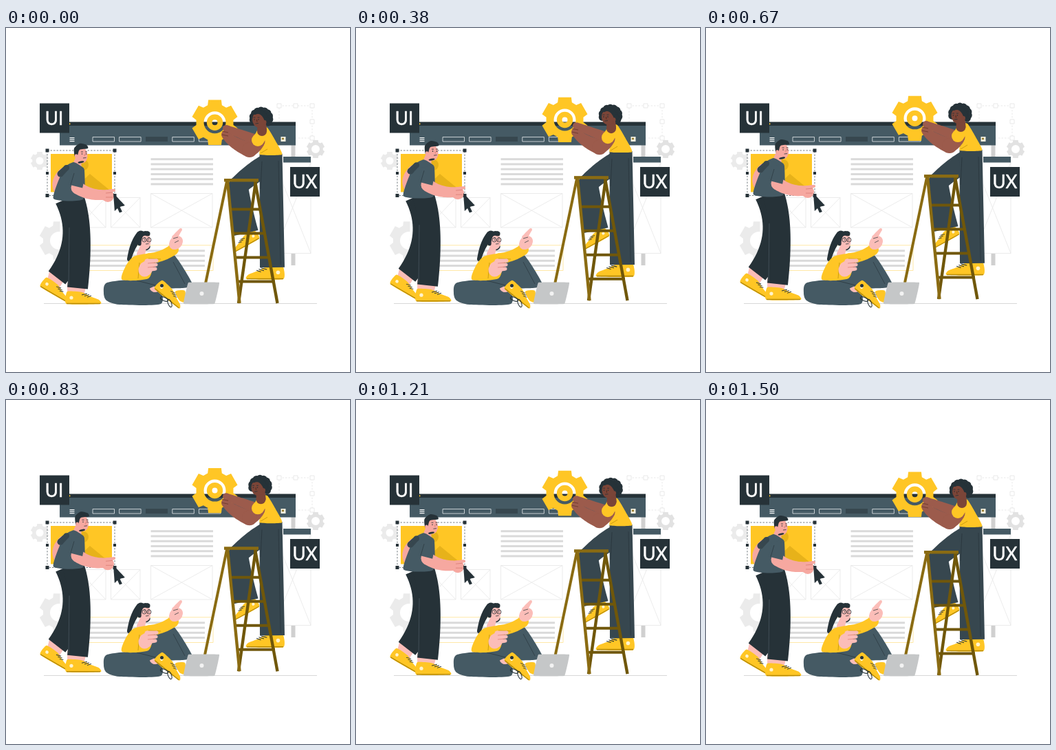
An HTML page with a canvas that plays this animation: 500 by 500 pixels, repeating every 1540 ms.

```html
<!DOCTYPE html>
<html lang="en">
<head>
<meta charset="utf-8">
<title>UI UX</title>
<style>
html, body { margin: 0; width: 100%; height: 100%; overflow: hidden; background: #fff; }
canvas { display: block; width: 500px; height: 500px; }
</style>
</head>
<body>
<canvas id="stage" width="500" height="500"></canvas>
<script>
const ctx = document.getElementById('stage').getContext('2d');
const LOOP = 1540, PEAK = 720, END = 1500, LIFT = 6;
const YELLOW = '#ffc625', SOLE = '#b78b08', DARK = '#263238', SLATE = '#455a64', DENIM = '#37474f',
  PINK = '#f6a8a0', ROSE = '#fbbdb8', BROWN = '#9c5b4c', UMBER = '#7b4538',
  WOOD = '#8a6b12', FRONT_WOOD = '#70570a', FAINT = '#ebebeb', ROW = '#dadada';

const parse = text => text.split(' ').map(p => p.split(',').map(Number));
const mix = (a, b, u) => a + (b - a) * u;

function fill(color, rule) {
  ctx.fillStyle = color;
  ctx.fill(rule);
}

function rect(color, x, y, w, h) {
  ctx.fillStyle = color;
  ctx.fillRect(x, y, w, h);
}

function frame(color, x, y, w, h, width = 0.8) {
  ctx.strokeStyle = color;
  ctx.lineWidth = width;
  ctx.strokeRect(x, y, w, h);
}

function oval(color, x, y, rx, ry = rx, turn = 0) {
  ctx.beginPath();
  ctx.ellipse(x, y, rx, ry, turn, 0, 7);
  fill(color);
}

function line(color, width, x1, y1, x2, y2) {
  ctx.beginPath();
  ctx.moveTo(x1, y1);
  ctx.lineTo(x2, y2);
  ctx.strokeStyle = color;
  ctx.lineWidth = width;
  ctx.stroke();
}

// Closed shape through a few points; bend 0 gives straight edges.
function shape(color, text, bend = 0.12) {
  const pts = parse(text), n = pts.length;
  ctx.beginPath();
  ctx.moveTo(...pts[0]);
  for (let i = 0; i < n; i++) {
    const [a, b, c, d] = [n - 1, 0, 1, 2].map(k => pts[(i + k) % n]);
    ctx.bezierCurveTo(b[0] + (c[0] - a[0]) * bend, b[1] + (c[1] - a[1]) * bend,
      c[0] - (d[0] - b[0]) * bend, c[1] - (d[1] - b[1]) * bend, ...c);
  }
  fill(color);
}

// Tapered limb along a curve through start, middle and end.
function limb(color, text, from, to, round = true) {
  const [a, m, b] = parse(text), left = [], right = [];
  const ctrl = [0, 1].map(k => 2 * m[k] - (a[k] + b[k]) / 2);
  for (let u = 0; u <= 1.001; u += 0.05) {
    const [x, y] = [0, 1].map(k => mix(mix(a[k], ctrl[k], u), mix(ctrl[k], b[k], u), u));
    const [dx, dy] = [0, 1].map(k => mix(ctrl[k] - a[k], b[k] - ctrl[k], u));
    const half = mix(from, to, u) / 2 / Math.hypot(dx, dy);
    left.push([x - dy * half, y + dx * half]);
    right.unshift([x + dy * half, y - dx * half]);
  }
  ctx.beginPath();
  [...left, ...right].forEach(p => ctx.lineTo(...p));
  fill(color);
  if (round) {
    oval(color, ...a, from / 2);
    oval(color, ...b, to / 2);
  }
}

function gear(color, x, y, r, holes) {
  ctx.beginPath();
  for (let i = 0; i < 6; i++)
    for (const [turn, k] of [[-0.39, 0.8], [-0.28, 1], [0.28, 1], [0.39, 0.8]]) {
      const angle = Math.PI / 2 + i * Math.PI / 3 + turn;
      ctx.lineTo(x + Math.cos(angle) * r * k, y + Math.sin(angle) * r * k);
    }
  ctx.closePath();
  for (const hole of holes) {
    ctx.moveTo(x + hole, y);
    ctx.arc(x, y, hole, 0, Math.PI * 2);
  }
  fill(color, 'evenodd');
}

function placed(x, y, draw, scale = 1, turn = 0, flip = 1) {
  ctx.save();
  ctx.translate(x, y);
  ctx.scale(scale * flip, scale);
  ctx.rotate(turn);
  draw();
  ctx.restore();
}

function shoe(x, y, scale, turn, flip) {
  placed(x, y, () => {
    shape(YELLOW, '0,0 1,-18 22,-17 34,-11 47,-6 49,0', 0.08);
    line(SOLE, 1.5, 0, -0.5, 49, -0.5);
    oval('#fff4cf', 7, -9, 2.6);
    for (let i = 0; i < 3; i++) line(DARK, 1, 22 + i * 4, -13 + i * 1.6, 30 + i * 3, -15 + i * 1.6);
  }, scale, turn, flip);
}

function face(x, y, ink, nose) {
  for (const side of [-1, 1]) {
    oval(ink, x + side * 3, y, 0.8);
    line(ink, 0.8, x + side * 3 - 1.5, y - 3, x + side * 3 + 1.5, y - 3);
  }
  line(nose, 0.8, x + 0.5, y, x + 1, y + 3.5);
  line(ink, 0.8, x - 1.5, y + 6, x + 3, y + 5.5);
}

function crossed(x, y, w, h) {
  frame('#e6e6e6', x, y, w, h);
  line('#e6e6e6', 0.8, x, y, x + w, y + h);
  line('#e6e6e6', 0.8, x + w, y, x, y + h);
}

function label(text, x, y, textX) {
  rect(DARK, x, y, 43, 43);
  ctx.font = '26px Lato, sans-serif';
  ctx.textAlign = 'center';
  ctx.fillStyle = ctx.strokeStyle = '#fff';
  ctx.lineWidth = 0.5;
  ctx.lineJoin = 'round';
  ctx.fillText(text, textX, y + 31.3);
  ctx.strokeText(text, textX, y + 31.3);
}

function dashed(color, x, y, w, h) {
  ctx.setLineDash([2.5, 2]);
  frame(color, x, y, w, h);
  ctx.setLineDash([]);
}

function scenery() {
  line('#cfcfcf', 0.8, 55, 400.5, 452, 400.5);
  gear(FAINT, 49, 193, 13.5, [5.5]);
  gear(FAINT, 77, 309, 29, [13]);
  gear('#e2e2e2', 450, 176, 13.5, [6]);

  dashed('#e4e4e4', 397, 113, 48, 47);
  for (const [x, y] of parse('397,113 421,113 445,113 445,136 445,160')) {
    rect('#fff', x - 3, y - 3, 6, 6);
    frame('#e4e4e4', x - 3, y - 3, 6, 6);
  }

  crossed(390, 195, 53, 132.5);
  rect('#fff', 78.5, 170, 325, 158);
  for (const y of [170, 328]) rect('#d0d0d0', 414.5, y, 6, 17);
  rect(SLATE, 403, 187, 40, 8.5);

  rect(SLATE, 78, 137, 343, 33.5);
  rect(DARK, 78, 136.5, 343, 5.5);
  oval(YELLOW, 92, 139.3, 1.4);
  for (let i = 0; i < 3; i++) rect('#fff', 92.5, 159 + i * 2.5, 7, 1.2);
  for (let i = 0; i < 5; i++) {
    if (i === 2) rect(DENIM, 203, 158, 32, 7);
    else frame('#e6eaec', 126 + i * 38.6, 158.5, 31.5, 6.5);
  }
  rect('#f3efdf', 399.5, 158, 7, 7);
  oval(WOOD, 402.5, 161, 1.4);

  for (let i = 0; i < 6; i++) rect(ROW, 210.5, 189.2 + i * 7.25, 90.5, 3);
  for (let i = 0; i < 4; i++) rect(ROW, 119, 322.3 + i * 7.25, 170, 3);
  frame('#ffe291', 112, 315.8, 189, 36.7);
  crossed(104, 246.5, 41, 43.5);
  crossed(152.5, 246.5, 42.5, 43.5);
  crossed(210.5, 240.5, 89.5, 49.5);

  rect(YELLOW, 65, 183, 89, 55.5);
  shape('#e7b21a', '74,238.5 90,222 103,230 122,212 154,238.5', 0);
  oval('#e7b21a', 112, 199, 8);
  dashed('#596269', 60, 178, 98, 65.5);
  for (const x of [60, 158])
    for (const [y, size] of [[178, 5], [211, 4], [243.5, 5]])
      rect(DARK, x - size / 2, y - size / 2, size, size);
  label('UI', 49, 109.5, 70);
}

function manHead() {
  oval(PINK, 110, 185, 8.5, 11.5, -0.1);
  shape(DARK, '100,187 99,175 107,168 117,170 119,175 107,177 104,185');
  oval(PINK, 102, 186, 2.2, 2.8);
  oval(DARK, 109, 195, 4.5, 1.4, -0.2);
  face(113.5, 183, DARK, '#d97c73');
}

function man(p) {
  limb(PINK, '82,208 72,224 76,240', 9, 8);
  limb(ROSE, '76,355 72,365 68,374', 26, 20, false);
  limb(ROSE, '103,372 102,380 101,388', 28, 24, false);
  shoe(50, 376, 0.9, 0.53);
  shoe(88, 401, 1);
  limb(DARK, '91,247 100,306 74,363', 41, 31, false);
  limb(DARK, '97,246 107,300 104,378', 32, 30, false);
  line('#52616a', 0.6, 92, 290, 91, 374);
  limb(PINK, '106,190 104,196 103,202', 10, 13);
  shape(SLATE, '98,195 84,204 69,248 112,249 114,207 108,200', 0.09);
  limb(DENIM, '88,203 84,207 79,212', 8, 9);
  limb(PINK, '104,232 124,241 148,242', 19, 14);
  oval(PINK, 148, 244, 9, 9);
  limb(PINK, '145,239 151,237 157,236', 6, 4);
  limb(SLATE, '104,205 104,215 101,230', 18, 21, false);
  line(DARK, 0.6, 94, 228, 99, 211);
  for (let i = 0; i < 2; i++) line('#d97c73', 0.8, 145, 240 + i * 6, 155, 239 + i * 7);
  placed(1.6 * p, 0, manHead);
}

function sitter() {
  limb(DARK, '196,301 186,315 179,336', 13, 6);
  oval(DARK, 204, 319, 6, 4, -0.4);
  limb(ROSE, '200,316 198,323 196,329', 9, 12);
  oval(ROSE, 203, 310, 7.5, 11.5);
  limb(DARK, '206,299 197,301 194,314', 7, 5);
  face(204.5, 308, DARK, '#d97c73');
  ctx.lineWidth = 0.8;
  for (const x of [201, 208]) {
    ctx.beginPath();
    ctx.arc(x, 308, 3, 0, 7);
    ctx.stroke();
  }

  shape(YELLOW, '246,383 260,382 260,398 252,396');
  shape(SLATE, '142,385 147,370 196,365 222,375 225,401 165,402 146,396');
  shape(SLATE, '187,367 214,341 244,330 271,372 257,378 210,378', 0.08);
  line(DARK, 0.7, 190, 367, 221, 375);
  line(DARK, 0.6, 243, 340, 260, 372);
  shape(YELLOW, '186,332 211,328 214,340 207,364 169,366 174,346');
  limb(YELLOW, '207,335 226,331 243,322', 15, 16);
  line(SOLE, 0.7, 194, 341, 192, 364);
  line(SOLE, 0.7, 207, 335, 225, 336);
  oval(ROSE, 247, 312, 11, 9, -0.8);
  limb(ROSE, '245,305 250,298 254,293', 8, 4);
  line(DARK, 0.7, 243, 306, 250, 304);
  line(DARK, 0.7, 245, 312, 251, 309);
  oval(ROSE, 203, 350, 10, 12, 0.5);
  for (let i = 0; i < 3; i++) limb(ROSE, `205,${339 + i * 6} 212,${338.5 + i * 6} ${219 - i},${338 + i * 6}`, 7, 5);
  for (let i = 0; i < 2; i++) line('#d97c73', 0.7, 206, 342 + i * 6, 217, 341 + i * 6);

  limb(ROSE, '212,377 216,380 222,377', 7, 9, false);
  shoe(216, 379, 0.92, 0.68);
  oval(DARK, 226.5, 374.5, 2.5);
  ctx.strokeStyle = DARK;
  ctx.lineWidth = 1.1;
  for (const side of [-1, 1]) {
    ctx.beginPath();
    ctx.ellipse(234 + side * 4, 397 + side * 3, 6, 2.5, 0.8 + side * 0.4, 0, 7);
    ctx.stroke();
  }
  shape('#c5c7c8', '265,370 310,370 303,401 258,401', 0.02);
  oval('#f2f2f2', 284.5, 386, 3);
}

function climberHead() {
  for (let i = 0; i < 10; i++) {
    const angle = Math.PI * (0.93 + i * 0.14);
    oval(DARK, 371 + Math.cos(angle) * 12, 131 + Math.sin(angle) * 11, 5.5);
  }
  limb(UMBER, '371,138 372,145 372,150', 13, 14);
  oval(UMBER, 367.5, 133, 9.5, 11.5);
  limb(DARK, '361,123 371,123 379,133', 6, 7);
  oval(UMBER, 376, 137, 2.5, 3);
  face(364, 133, DARK, '#492216');
}

function ladder() {
  line(WOOD, 4, 321, 223, 289, 376);
  for (let i = 0; i < 4; i++) line(FRONT_WOOD, 4, 327 + i * 3, 263.5 + i * 35, 370 + i * 7, 263.5 + i * 35);
  line(FRONT_WOOD, 4.4, 363, 223, 338, 400);
  line(WOOD, 4.4, 322, 223, 339.5, 400);
  line(FRONT_WOOD, 4.4, 362, 223, 394.5, 400);
  rect(WOOD, 317, 219, 50, 4.5);
}

function climber(p) {
  gear(YELLOW, 303.5, 137.3, 34, [16, 11.7, 4]);
  shoe(368, 306, 0.82, 0.51, -1);
  shoe(403, 365, 1.08, 0, -1);
  limb(DENIM, '384,197 360,211 337,230', 33, 28);
  limb(DENIM, '337,226 342,262 349,298', 28, 36, false);
  limb(DENIM, '385,183 386,265 387,348', 33, 36, false);
  line(DARK, 0.7, 372, 194, 370, 234);
  line(DARK, 0.6, 396, 193, 399, 344);
  limb(BROWN, '320,146 338,153 362,162', 10, 15);
  shape(YELLOW, '367,145 380,145 394,168 401,184 369,184 371,168', 0.08);
  limb(BROWN, '319,155 333,167 354,177', 12, 22);
  limb(BROWN, '354,177 362,172 368,165', 21, 17);
  limb(YELLOW, '372,153 369,159 366,163', 16, 18);
  for (let i = 0; i < 2; i++) line('#5f3022', 0.7, 314, 150 + i * 5, 323, 152 + i * 5);
  line(SOLE, 0.7, 370, 182, 380, 176);
  placed(-1.6 * p, 0, climberHead);
  ladder();
}

function lift(t) {
  const wave = u => (1 - Math.cos(u * Math.PI)) / 2;
  if (t < PEAK) return mix(Math.sin(t / PEAK * Math.PI / 2), wave(t / PEAK), 0.5);
  return 1 - wave(Math.min(1, (t - PEAK) / (END - PEAK)));
}

function draw() {
  const p = lift(performance.now() % LOOP);
  rect('#fff', 0, 0, 500, 500);
  scenery();
  placed(0, -LIFT * p, () => climber(p));
  label('UX', 413, 202, 434.5);
  placed(0, -LIFT * p, () => man(p));
  sitter();
  shape(DARK, '156,240 173,258 165.5,260 169,267 165,268.5 162,262 158,266', 0);
  requestAnimationFrame(draw);
}
draw();
</script>
</body>
</html>
```
